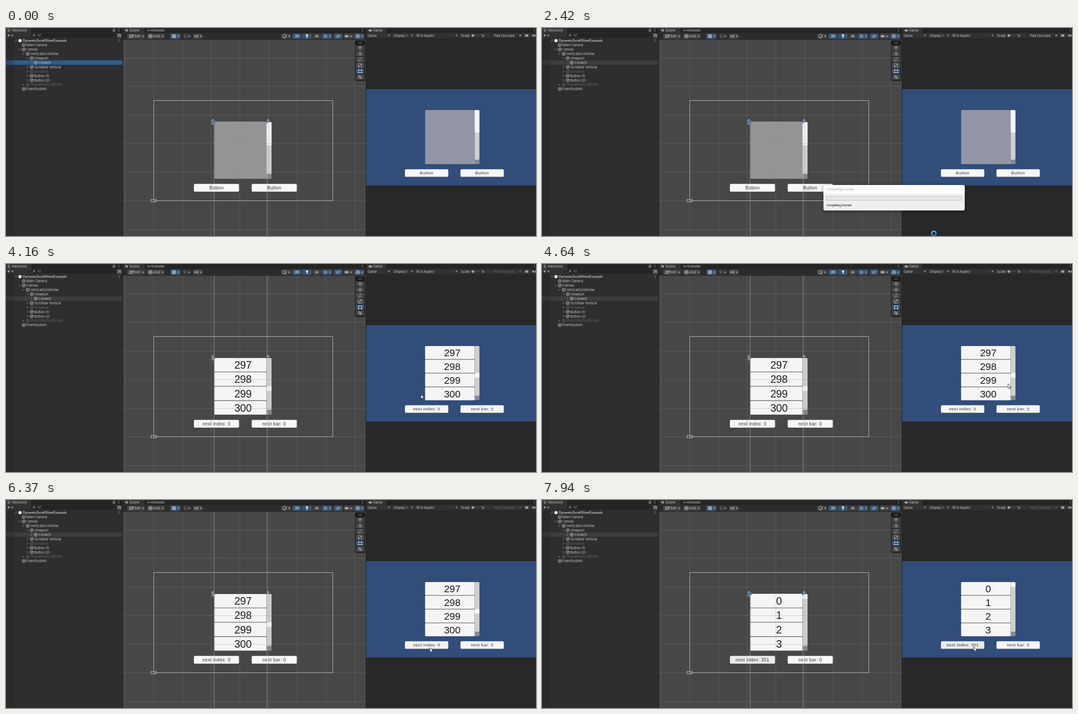
Write an HTML page with a canvas that moves like this. It is 1193x469 px and loops after 8 s.

```html
<!DOCTYPE html>
<html lang="en">
<head>
<meta charset="utf-8">
<title>Dynamic scroll view</title>
<style>
html, body { margin: 0; width: 100%; height: 100%; overflow: hidden; background: #282828; }
canvas { display: block; }
</style>
</head>
<body>
<canvas id="stage" width="1193" height="469"></canvas>
<script>
const ctx = document.getElementById('stage').getContext('2d');
const LOOP = 8000;
const UI = 'Inter, "Liberation Sans", sans-serif';
const SANS = '"Liberation Sans", Arial, sans-serif';
const INK = '#c8c8c8', DIM = '#696969', BLUE = '#3b5673', GREY = '#414141';

const T = {
  deselect: 1400, dialog: 1600, caption: 2020, dialogEnd: 3230,
  play: 4100, hover: 5600, press: 6670, release: 6850
};

// Pointer path: time, x, y
const path = [
  [400, 640, -14], [600, 735, 198], [890, 517, -14],
  [1350, 700, -14], [1500, 772, 38], [1560, 772, 38], [1680, 878, 437],
  [2360, 878, 437], [2420, 882, 463], [2510, 882, 463], [2850, 760, 262], [3170, 734, 298],
  [3230, 734, 300], [3440, 697, 461], [3500, 697, 461], [3600, 618, 440], [3950, 905, 300],
  [4040, 905, 300], [4640, 1049, 270], [4860, 1049, 270], [5220, 1011, 209],
  [5410, 1011, 209], [5710, 940, 358], [5860, 940, 358], [6100, 996, 330],
  [6370, 954, 333], [6460, 954, 333], [6520, 940, 323], [7210, 940, 323],
  [7510, 952, 331], [7790, 952, 331], [7940, 972, 331]
];

function rect(x, y, w, h, color, r = 0) {
  ctx.fillStyle = color;
  ctx.beginPath();
  ctx.roundRect(x, y, w, h, r);
  ctx.fill();
}
function frame(x, y, w, h, color) {
  ctx.strokeStyle = color;
  ctx.lineWidth = 1;
  ctx.strokeRect(x, y, w, h);
}
function line(x1, y1, x2, y2, color, width = 1) {
  ctx.strokeStyle = color;
  ctx.lineWidth = width;
  ctx.beginPath();
  ctx.moveTo(x1, y1);
  ctx.lineTo(x2, y2);
  ctx.stroke();
}
function disc(x, y, r, color) {
  ctx.fillStyle = color;
  ctx.beginPath();
  ctx.arc(x, y, r, 0, 7);
  ctx.fill();
}
function text(s, x, y, { color = INK, size = 7.4, font = UI, weight = 400, align = 'left', space = 0 } = {}) {
  ctx.font = `${weight} ${size}px ${font}`;
  ctx.letterSpacing = space + 'px';
  ctx.textAlign = align;
  ctx.textBaseline = 'alphabetic';
  ctx.fillStyle = color;
  ctx.fillText(s, x, y + size * 0.36);
}
function glyph(d, x, y, color = INK, fill = false, width = 0.9) {
  ctx.save();
  ctx.translate(x, y);
  ctx.lineWidth = width;
  ctx.strokeStyle = ctx.fillStyle = color;
  const p = new Path2D(d);
  fill ? ctx.fill(p) : ctx.stroke(p);
  ctx.restore();
}
const down = (x, y, color = '#a8a8a8') => glyph('M-2.6-1.4H2.6L0 1.8Z', x, y, color, true);
const right = (x, y, color) => glyph('M-1.4-2.6V2.6L1.9 0Z', x, y, color, true);
const dots = (x, y) => [-2.5, 0, 2.5].forEach(d => disc(x, y + d, 0.7, INK));
const shade = v => `rgb(${v},${v},${v})`;
const clamp = v => Math.max(0, Math.min(1, v));

const rows = [
  ['DynamicScrollViewExample', 38, 'v'], ['Main Camera', 46], ['Canvas', 46, 'v'],
  ['VerticalScrollView', 55, 'v'], ['Viewport', 64, 'v'], ['Content', 73],
  ['Scrollbar Vertical', 64, '>'], ['Scrollbar', 64, '>', true], ['Button (1)', 64, '>'],
  ['Button (2)', 64, '>'], ['HorizontalScrollView', 55, '>', true], ['EventSystem', 46]
];

function hierarchy(t) {
  rect(0, 0, 262, 469, '#2e2e2e');
  rect(0, 22, 18, 447, '#2a2a2a');
  rect(0, 0, 262, 11, '#242424');
  rect(0, 0, 57, 11, '#333333');
  rect(0, 11, 262, 11, '#323232');
  glyph('M-3-2.5H3M-2 0H3M-2 2.5H3', 6, 5.5);
  text('Hierarchy', 13, 5.5);
  glyph('M-2-.3H2V2.5H-2ZM-1.2-.5V-2A1.3 1.3 0 0 1 1.4-2', 243, 5);
  dots(254, 5);
  glyph('M-3 0H3M0-3V3', 6, 16.5, INK, false, 1.2);
  down(14.5, 17);
  rect(57, 12, 192, 9.5, '#232323', 3);
  glyph('M1.8-.6A1.7 1.7 0 1 1-1.6-.6A1.7 1.7 0 1 1 1.8-.6M-1 1L-2.6 2.8', 63, 16.5);
  text('All', 70, 16.8, { color: '#858585' });
  glyph('M-3.5-3H3.5V3H-3.5ZM-2 1.5L1.5-1.5M-1-1.5H1.5V1', 255, 17);

  const blue = t < T.deselect;
  rect(0, 73, 262, 10, blue ? '#2c5d87' : '#3d3d3d');
  rect(0, 73, 18, 10, blue ? '#2b4a78' : '#363636');
  rows.forEach(([label, x, fold, off], i) => {
    const y = 28.5 + 9.93 * i, color = off ? '#626262' : INK;
    if (label === 'Content' && t >= T.play) fold = '>';
    if (fold) (fold === 'v' ? down : right)(x - 15.5, y, '#6c6c6c');
    if (i) glyph('M0-3.8L3.5-2V2L0 3.8L-3.5 2V-2ZM-3.5-2L0-.2L3.5-2M0-.2V3.8', x - 6, y, color);
    else disc(x - 6.5, y, 3.8, '#dedede');
    text(label, x, y, { color, weight: i ? 400 : 600, size: i ? 7.4 : 7.3 });
  });
  dots(254.5, 28.5);
  rect(262, 0, 1.5, 469, '#191919');
}

function tool(x, w, color, d, arrow, ink = '#d2d2d2') {
  rect(x, 12.5, w, 12, color, 1.5);
  if (d) glyph(d, x + (arrow ? 8 : w / 2), 18.5, ink);
  if (arrow) down(x + w - 4.5, 19);
}

const HAND = 'M-2.5 0L-1 3.5H2L3-1.5M-1.8 1V-3M-.3 0V-4M1.3 0V-3.3M2.8 0V-2';
const MOVE = 'M-4.5 0H4.5M0-4.5V4.5M-1.5-3L0-4.5L1.5-3M-1.5 3L0 4.5L1.5 3M-3-1.5L-4.5 0L-3 1.5M3-1.5L4.5 0L3 1.5';
const TURN = 'M-3.5 1A3.6 3.6 0 0 1 2.5-2.7M3.5-1A3.6 3.6 0 0 1-2.5 2.7M2.7-4.3V-2.3H.7M-2.7 4.3V2.3H-.7';
const SIZE = 'M-4-4H4V4H-4ZM-4 1H-1V4M-.5-.5L2.5-2.5M.5-2.5H2.5V-.5';
const BOX = 'M-3.5-3H3.5V3H-3.5ZM-4.5-3.5h2v1.5h-2zM2.5-3.5h2v1.5h-2zM-4.5 2h2v1.5h-2zM2.5 2h2v1.5h-2z';
const ALL = 'M-4 4L4-4M-4 0A4 4 0 0 1 0-4M4 0A4 4 0 0 1 0 4M-1.5-1.5H1.5V1.5H-1.5ZM-4-4L4 4';
const GRID = 'M-3.5-3.5H3.5V3.5H-3.5ZM-1.2-3.5V3.5M1.2-3.5V3.5M-3.5-1.2H3.5M-3.5 1.2H3.5';

function sceneChrome() {
  rect(263.5, 0, 546.5, 11, '#242424');
  rect(263.5, 0, 48, 11, '#333333');
  rect(263.5, 11, 546.5, 15.5, '#2b2b2b');
  glyph('M-3-1.2H3M-3 1.2H3M-1.2-3V3M1.2-3V3', 271.5, 5.2);
  text('Scene', 278, 5.5);
  glyph('M-3-2L0 0H3M-3 2L0 0M1.5-1.5L3 0L1.5 1.5', 321, 5.2);
  text('Animator', 326, 5.5);
  dots(802, 5);

  tool(273, 40, GREY, 'M-3-3H3V3H-3ZM-3 3L3-3', true);
  text('Pivot', 284.5, 18.7);
  tool(317, 40, GREY, 'M-4 0A4 4 0 1 1 4 0A4 4 0 1 1-4 0M0-4V4M-4 0H4', true);
  text('Local', 327.5, 18.7);
  tool(370, 22.5, BLUE, GRID, true);
  tool(397, 20, '#353535', 'M-3.5-3.5H0M-3.5-3.5V3.5H0M2-3V3M-3.5 0H0', true, '#777');
  tool(421, 22, GREY, 'M-4-3.5V3.5M0-3.5V3.5M3.5-3.5V3.5M-4 0H3.5', true);
  tool(619, 23, GREY, 'M-4 0A4 4 0 1 1 4 0A4 4 0 1 1-4 0M3-2.5A4 4 0 0 1-2 3', true);
  tool(645, 20, BLUE);
  text('2D', 655, 18.7, { align: 'center', weight: 700, size: 7, color: '#e0e0e0' });
  tool(667, 21, BLUE);
  glyph('M-1.2 2V.8A2.6 2.6 0 1 1 1.2.8V4H-1.2Z', 677.5, 18, '#e0e0e0', true);
  tool(690, 19, GREY, 'M-3.5-1H-2L0-2.7V2.7L-2 1H-3.5ZM1.5-2L3.5 2M3.5-2L1.5 2');
  tool(711, 23, BLUE, 'M-3.5-1L0-3L3.5-1L0 1ZM-3.5 1.3L0 3.3L3.5 1.3', true);
  tool(738, 19, BLUE, 'M-4 0Q0-4.5 4 0Q0 4.5-4 0M-3.5 3.5L3.5-3.5');
  tool(760, 22, GREY);
  rect(763, 16, 6, 5, '#b0b0b0');
  glyph('M0 0L3-2V2Z', 769, 18.5, '#b0b0b0', true);
  down(777, 19);
  tool(784, 22, BLUE, 'M-4 0A4 4 0 1 1 4 0A4 4 0 1 1-4 0M-4 0H4M0-4V4', true);
}

function toolbox() {
  rect(785.5, 28, 23, 91, '#1a1a1a', 2);
  line(792, 32, 802, 32, '#666');
  line(792, 34.5, 802, 34.5, '#666');
  [HAND, MOVE, TURN, SIZE, BOX, ALL].forEach((d, i) => {
    const y = 39 + 13.1 * i;
    rect(787, y, 20, 12.2, i === 4 ? '#2f4a6e' : '#434343');
    glyph(d, 797, y + 6.1, i === 4 ? '#e0e0e0' : '#b4b4b4');
  });
}

// One drawing of the list and its buttons serves both views.
function listView(v, t) {
  const { x, y, size, bar, pitch, track } = v;
  const playing = t >= T.play, top = t >= T.release;
  rect(x, y, size, size, v.panel, 2);
  const bx = x + bar, bw = size - bar;
  rect(bx, y, bw, size, v.corner, 2);
  rect(bx, y, bw, track, '#d0d0d0', 2);
  const h = playing ? 11 : track * 0.455;
  const pos = playing && !top ? (track - h) * 0.6 : 0;
  if (playing) {
    rect(x, y, bar, size, '#858585');
    for (let i = 0; i < 4; i++) {
      const ry = y + pitch * i;
      rect(x, ry, bar - 0.5, pitch - 1.8, '#f5f5f5', 1.5);
      text(String(i + (top ? 0 : 297)), x + size / 2, ry + pitch / 2 - 0.5,
        { size: v.digits, font: SANS, align: 'center', color: '#1c1c1c' });
    }
  }
  rect(bx, y + pos, bw, h, '#f6f6f6', 2);

  const labels = playing ? ['next index: ' + (top ? 351 : 0), 'next bar: 0'] : ['Button', 'Button'];
  labels.forEach((label, i) => {
    let tone = 247;
    if (!i && v.hovers && t >= T.hover) tone = 243;
    if (!i && t >= T.press) tone = 243 - 43 * clamp((t - T.press) / 100);
    if (!i && top) tone = 200 + 35 * clamp((t - T.release) / 100);
    const left = v.buttons[i];
    rect(left, v.by, v.bw, v.bh, shade(tone), 2.5);
    text(label, left + v.bw / 2, v.by + v.bh / 2 - 0.1,
      { size: v.label, font: SANS, align: 'center', color: '#323232', space: 0.45 });
  });
}

const sceneList = {
  x: 469.5, y: 212, size: 128, bar: 117, pitch: 32.3, track: 117, panel: '#959595', corner: '#868686',
  digits: 23.4, buttons: [423, 553], by: 351.5, bw: 101.5, bh: 17.5, label: 10.2
};
const gameList = {
  x: 943.5, y: 185, size: 122, bar: 111.7, pitch: 31, track: 112, panel: '#9296a5', corner: '#848a9a',
  digits: 22.2, buttons: [898, 1023], by: 318.5, bw: 97.5, bh: 17, label: 9.8, hovers: true
};

function scene(t) {
  rect(263.5, 26, 546.5, 443, '#474747');
  listView(sceneList, t);
  const grid = 'rgba(130,130,130,.4)';
  for (let i = -1; i < 8; i++) {
    const x = Math.round(332 + 64.65 * i) + 0.5, y = Math.round(131 + 64.5 * i) + 0.5;
    line(x, 26, x, 469, grid);
    if (i < 6) line(263.5, y, 810, y, grid);
  }
  frame(332.5, 163.5, 403, 226, '#c4c4c4');
  frame(326.5, 386.5, 12, 5.5, '#c4c4c4');

  const middle = t >= T.play && t < T.release;
  const edge = 'rgba(200,200,200,.65)';
  [468.5, 587.5].forEach(x => line(x, middle ? 26 : 211.5, x, 469, edge));
  if (!middle) line(468.5, 211.5, 587.5, 211.5, edge);
  glyph('M1-3.5V2L-3 0ZM1 8.5V3.2L-3 5.5Z', 465.5, 209, '#e0e0e0');
  glyph('M-1-3.5V1.5L3-.5ZM0 8L3 5', 590, 209, '#e0e0e0');
  if (!middle) {
    disc(468.7, 211.7, 3.4, '#3f7fc8');
    disc(468.7, 211.7, 1.5, '#4a6d9a');
    disc(587.3, 211.7, 2.7, '#3f7fc8');
  }
  sceneChrome();
  toolbox();
  rect(810, 0, 1.5, 469, '#191919');
}

function game(t) {
  rect(811, 0, 382, 469, '#282828');
  rect(811, 0, 382, 11, '#242424');
  rect(811, 0, 45, 11, '#333333');
  rect(811, 11, 382, 11.5, '#323232');
  rect(816, 3.5, 8, 4, INK, 2);
  disc(818, 5.4, 0.8, '#333');
  disc(822, 5.4, 0.8, '#333');
  text('Game', 827, 5.5);
  dots(1189.5, 5);
  [['Game', 814], ['Display 1', 873], ['16:9 Aspect', 923], ['Scale', 1024], ['1x', 1070]]
    .forEach(([s, x]) => text(s, x, 17));
  const mode = t >= T.play ? DIM : INK;
  text('Play Focused', 1098, 17, { color: mode });
  [862, 914.5, 1014].forEach(x => down(x, 17));
  down(1157.5, 17, mode);
  [868, 919, 1019, 1093, 1164, 1181].forEach(x => line(x + .5, 12, x + .5, 22, '#292929'));
  line(1046, 17, 1066, 17, '#5e5e5e');
  disc(1051, 17, 3, '#a0a0a0');
  glyph('M-2.2 0A2.2 3 0 1 1 2.2 0A2.2 3 0 1 1-2.2 0M-4-2.5L4 2.5M4-2.5L-4 2.5M-4 0H4', 1172, 17);
  glyph('M-3.5-1.2H-2L0-3V3L-2 1.2H-3.5Z', 1188, 17, INK, true);
  glyph('M1.5-2Q3 0 1.5 2M3-3Q5 0 3 3', 1188, 17);
  rect(811, 138, 382, 217, '#314d79');
  listView(gameList, t);
}

function dialog(t) {
  if (t < T.dialog || t >= T.dialogEnd) return;
  const caption = t < T.caption ? 'Reloading Domain' : 'Completing Domain';
  ctx.save();
  ctx.shadowColor = 'rgba(0,0,0,.45)';
  ctx.shadowBlur = 8;
  ctx.shadowOffsetY = 2;
  rect(633.5, 354, 318, 57.5, '#f0f0f0', 4);
  ctx.restore();
  rect(633.5, 354, 318, 19.5, '#fff', [4, 4, 0, 0]);
  text(caption, 639, 363.7, { size: 7, font: '"Open Sans", sans-serif', color: '#9b9494' });
  rect(639, 379.5, 306.5, 9.5, '#e6e6e6');
  frame(639.5, 379.5, 305.5, 9, '#bcbcbc');
  text(caption, 640, 399.7, { size: 7, font: SANS, color: '#111', space: -0.25 });
}

function pointer(t) {
  if (t < 400 || (t >= 890 && t < 1350)) return;
  const n = path.findIndex(p => p[0] > t);
  const b = n < 0 ? path[path.length - 1] : path[n];
  const a = n < 0 ? b : path[n - 1];
  const k = n < 0 ? 0 : (t - a[0]) / (b[0] - a[0]);
  const x = a[1] + (b[1] - a[1]) * k, y = a[2] + (b[2] - a[2]) * k;
  if (t >= T.deselect - 50 && t < T.dialogEnd) {
    const turn = t / 160;
    ctx.lineWidth = 2.7;
    ctx.strokeStyle = '#1c7fd6';
    ctx.beginPath();
    ctx.arc(x, y, 4.9, 0, 7);
    ctx.stroke();
    ctx.strokeStyle = '#3cb4f2';
    ctx.beginPath();
    ctx.arc(x, y, 4.9, turn, turn + 3.6);
    ctx.stroke();
  } else {
    const arrow = 'M0 0V10L2.3 7.9L4 11.8L5.7 11L4 7.3H7Z';
    glyph(arrow, x, y, '#fff', true);
    glyph(arrow, x, y, '#111', false, 0.8);
  }
}

function draw(now) {
  const t = now % LOOP;
  hierarchy(t);
  scene(t);
  game(t);
  dialog(t);
  pointer(t);
  requestAnimationFrame(draw);
}
draw(0);
</script>
</body>
</html>
```
